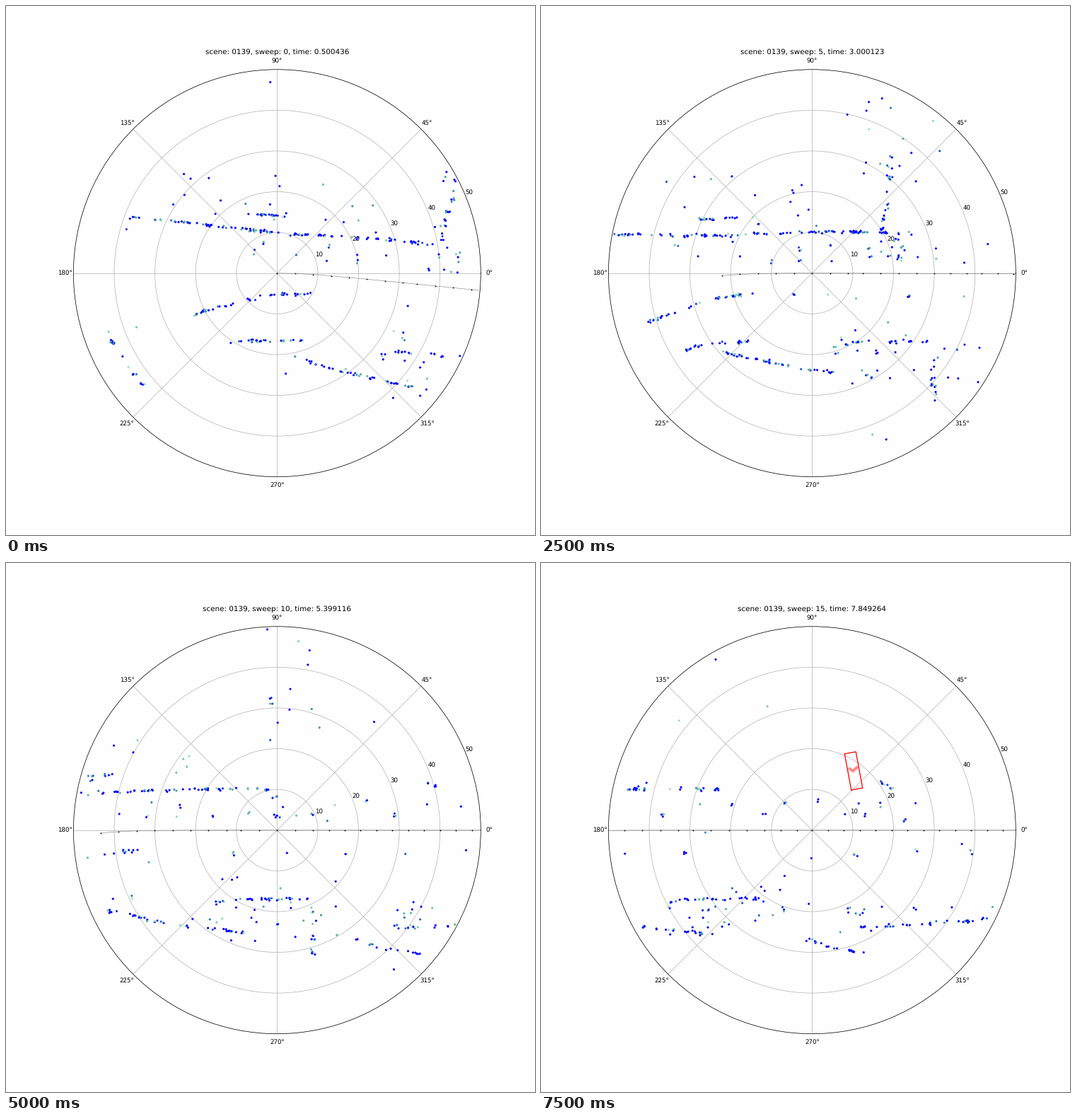
A matplotlib script for the animation above (8000 ms loop, 748 px wide and 748 px high).

```python
import numpy as np
import matplotlib.pyplot as plt
from matplotlib.animation import FuncAnimation
from matplotlib.colors import LinearSegmentedColormap

SIZE, SWEEPS, RANGE = 748, 16, 50
PX = 5.76                 # pixels per metre
CX, CY = 383.35, 377.8    # stage position of the sensor
HOME = 4                  # the ground map is laid out around this sweep

# Known clock readings; the sweeps between them are evenly spaced
CLOCK = {0: 0.500436, 2: 1.500172, 4: 2.50054, 6: 3.499706, 7: 3.999538,
         8: 4.399346, 12: 6.398886, 15: 7.849264}

# Kerbs and walls on the ground map
WALLS = [
    [(168, 452), (263, 415), (332, 406)],
    [(222, 490), (245, 481), (325, 473)],
    [(280, 489), (383, 511), (497, 524)],
    [(60, 323), (270, 325), (420, 319), (520, 320)],
    [(442, 482), (469, 475), (573, 474)],
    [(640, 530), (670, 543), (735, 552)],
    [(697, 516), (770, 513), (905, 503)],
    [(230, 302), (305, 300)],
    [(45, 485), (110, 560)],
]
# Side streets, only visible from ahead
CROSSINGS = [
    [(506, 318), (517, 260), (521, 190)],
    [(582, 485), (582, 558)],
    [(741, 308), (768, 324)],
]
# Loose reflections: x0, x1, y0, y1, count
FIELDS = [(110, 420, 240, 312, 60), (435, 625, 440, 535, 75),
          (697, 735, 478, 522, 30)]
AHEAD_FIELDS = [(500, 562, 318, 362, 36), (477, 600, 110, 250, 50)]
# Rows of posts: first x, gap, y
ROWS = [(215, 45, 340), (247, 48, 358), (382, 82, 409), (445, 50, 486)]

# Annotated vehicle: outline centre, mark centre, turn of the mark
VEHICLES = {6: (666.5, 336.5, 665, 332, 90), 15: (442, 294, 441, 291, 0)}
TAGGED = {6: (468, 352)}


def clock(k):
    return np.round(np.interp(k, list(CLOCK), list(CLOCK.values())), 6)


def heading(k):
    return np.radians(5.7) * (1 - np.tanh(k / 2.4))


def drive_path(n=32):
    k = np.arange(n)
    t = clock(k) + 0.5 * np.maximum(k - SWEEPS + 1, 0)
    speed = 51 - 6 / (1 + np.exp(-4 * (t[:-1] - 6.4)))
    turn = heading(k[:-1] + 0.5)
    legs = (speed * np.diff(t))[:, None] * np.column_stack([np.cos(turn), np.sin(turn)])
    path = np.vstack([[0, 0], np.cumsum(legs, axis=0)])
    return path - path[HOME]


PATH = drive_path()


def to_map(p):
    return (np.asarray(p, float) - (CX, CY)) * (1, -1)


def to_polar(p):
    return np.arctan2(p[:, 1], p[:, 0]), np.hypot(p[:, 0], p[:, 1]) / PX


def rotate(p, angle):
    c, s = np.cos(angle), np.sin(angle)
    return np.asarray(p) @ np.array([[c, s], [-s, c]])


def from_ego(p, k):
    return rotate(p - PATH[k], -heading(k))


def wall_hits(rng, pts, density=0.27):
    """Hits along a polyline, gathered in small clumps."""
    x, y = np.transpose(pts)
    s = np.append(0, np.cumsum(np.hypot(np.diff(x), np.diff(y))))
    n = int(s[-1] * density)
    at = rng.choice(rng.uniform(0, s[-1], int(n * 0.8)), n)
    line = np.column_stack([np.interp(at, s, x), np.interp(at, s, y)])
    return line + rng.normal(0, (2.2, 1.1), line.shape)


def field_hits(rng, k, x0, x1, y0, y1, n):
    """A fixed scatter of reflectors, some of them seen in each sweep."""
    fixed = np.random.default_rng(x0).uniform((x0, y0), (x1, y1), (n, 2))
    return fixed[rng.random(n) < 0.35]


def post_hits(rng, first, gap, y):
    x = np.arange(first, 920, gap)
    posts = np.column_stack([x, np.full(len(x), y)])
    posts = posts + np.random.default_rng(first).normal(0, (6, 3), posts.shape)
    hits = np.repeat(posts, rng.integers(0, 4, len(x)), axis=0)
    return hits + rng.normal(0, 1.7, hits.shape)


def sweep_hits(k):
    rng = np.random.default_rng(139 + k)
    around = ([wall_hits(rng, w) for w in WALLS]
              + [field_hits(rng, k, *f) for f in FIELDS]
              + [post_hits(rng, *r) for r in ROWS])
    ahead = ([wall_hits(rng, w) for w in CROSSINGS]
             + [field_hits(rng, k, *f) for f in AHEAD_FIELDS])
    around = from_ego(to_map(np.vstack(around)), k)
    ahead = from_ego(to_map(np.vstack(ahead)), k)
    a, r = rng.uniform(0, 2 * np.pi, 9), RANGE * PX * np.sqrt(rng.random(9))
    stray = np.column_stack([r * np.cos(a), r * np.sin(a)])

    p = np.vstack([around, ahead[ahead[:, 0] > -10], stray])
    far = np.hypot(p[:, 0], p[:, 1]) / (RANGE * PX)
    p = p[(far < 0.99) & (rng.random(len(p)) > 0.45 * far ** 2)]
    return p, np.clip(rng.uniform(-1.25, 1, len(p)), 0, 1)


plt.rcParams["text.hinting"] = "none"
fig = plt.figure(figsize=(12, 12), dpi=SIZE / 12, facecolor="#fefefe")
ax = fig.add_subplot(projection="polar", facecolor="#fefefe")
ax.set_ylim(0, RANGE)
ax.set_yticks(range(10, RANGE + 1, 10))
title = ax.set_title("")

radar = LinearSegmentedColormap.from_list(
    "radar", ["#0000ff", "#2060c8", "#46a0a8", "#62c2a2", "#a6e4c0"])
track, = ax.plot([], [], color="0.45", lw=0.6, zorder=2)
stops = ax.scatter([], [], s=4.5, c="black", lw=0, zorder=4)
hits = ax.scatter([], [], s=13, c=[], cmap=radar, vmin=0, vmax=1, lw=0, zorder=3)
box, = ax.plot([], [], color="red", lw=1.5, zorder=5)
mark, = ax.plot([], [], color="red", alpha=0.45, lw=4.5, zorder=5,
                solid_capstyle="butt", solid_joinstyle="miter")
square, = ax.plot([], [], "s", ms=4.6, mfc="#3000c0", mec="red", mew=1.2, zorder=5)

OUTLINE = rotate([(-8.1, -26), (8.1, -26), (8.1, 26), (-8.1, 26), (-8.1, -26)],
                 np.radians(10.5))
CHEVRON = [(-6, 1), (0, -3), (7, 3)]


def show_vehicle(k):
    for line in (box, mark, square):
        line.set_data([], [])
    if k in VEHICLES:
        x, y, mx, my, turn = VEHICLES[k]
        box.set_data(*to_polar(OUTLINE + to_map((x, y))))
        mark.set_data(*to_polar(rotate(CHEVRON, np.radians(turn)) + to_map((mx, my))))
    if k in TAGGED:
        square.set_data(*to_polar(to_map([TAGGED[k]])))


def update(k):
    title.set_text(f"scene: 0139, sweep: {k}, time: {float(clock(k))}")

    theta, r = to_polar(from_ego(PATH, k))
    track.set_data(theta, r)
    stops.set_offsets(np.column_stack([theta, r])[r < RANGE * 0.995])

    p, level = sweep_hits(k)
    hits.set_offsets(np.column_stack(to_polar(p)))
    hits.set_array(level)
    show_vehicle(k)
    return title, track, stops, hits, box, mark, square


anim = FuncAnimation(fig, update, frames=SWEEPS, interval=500,
                     repeat=True, repeat_delay=0, blit=False)
plt.show()
```
